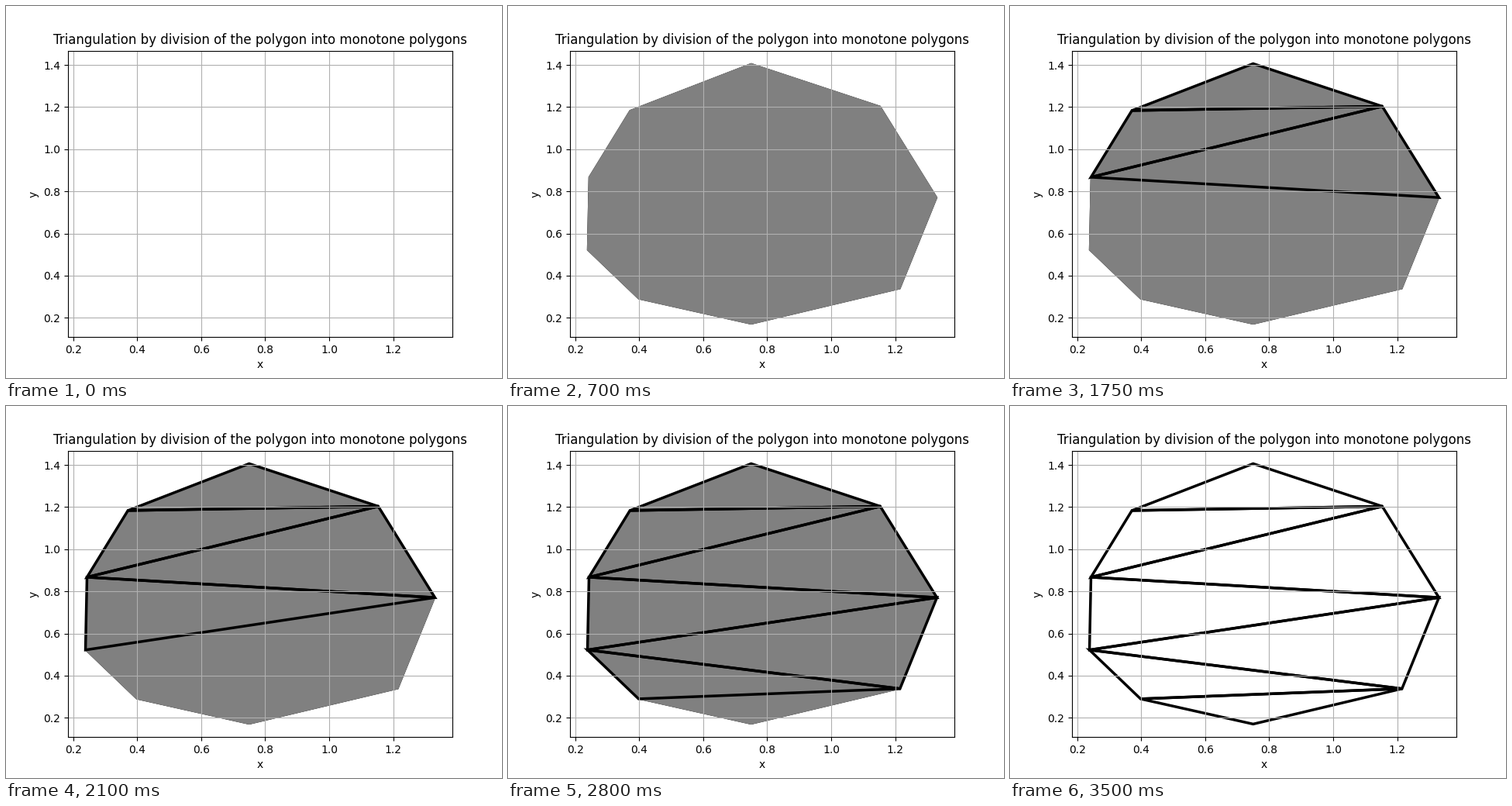
These frames come from a looping animation (640x480 px, 3850 ms). A matplotlib script:

```python
from itertools import chain, zip_longest

import matplotlib.pyplot as plt
from matplotlib.animation import FuncAnimation
from matplotlib.patches import Polygon

INTERVAL = 350

# Key points: two monotone chains, top to bottom, between the extremes
TOP, BOTTOM = (0.75, 1.4062), (0.75, 0.1701)
LEFT = [(0.3712, 1.1837), (0.2433, 0.8673), (0.2386, 0.522), (0.3983, 0.2897)]
RIGHT = [(1.1533, 1.2036), (1.3304, 0.7706), (1.215, 0.338)]

fig, ax = plt.subplots(figsize=(6.4, 4.8), dpi=100)
ax.set_title("Triangulation by division of the polygon into monotone polygons")
ax.set_xlabel("x")
ax.set_ylabel("y")
ax.grid(True)


def add_polygon(points, **style):
    return ax.add_patch(Polygon(points, closed=True, **style))


def zigzag():
    """Alternate between the chains from top to bottom."""
    pairs = chain.from_iterable(zip_longest(LEFT, RIGHT))
    return [TOP, *(p for p in pairs if p), BOTTOM]


boundary = [TOP, *RIGHT, BOTTOM, *reversed(LEFT)]
outline = add_polygon(boundary, fill=False, edgecolor="black", linewidth=1)
body = add_polygon(boundary, color="gray", linewidth=1)

# Every three neighbours of the zigzag form one triangle
strip = zigzag()
triangles = [
    add_polygon(corners, fill=False, edgecolor="black", linewidth=2.5)
    for corners in zip(strip, strip[1:], strip[2:])
]
ax.autoscale_view()

# Empty axes, outline, filled body, one step per triangle, bare result
FRAMES = len(triangles) + 4


def update(frame):
    outline.set_visible(frame >= 1)
    body.set_visible(2 <= frame < FRAMES - 1)
    for k, triangle in enumerate(triangles):
        triangle.set_visible(frame >= 3 + k)
    return [outline, body, *triangles]


animation = FuncAnimation(fig, update, frames=FRAMES, interval=INTERVAL,
                          init_func=lambda: update(0), repeat=True,
                          repeat_delay=0, blit=False)
plt.show()
```
